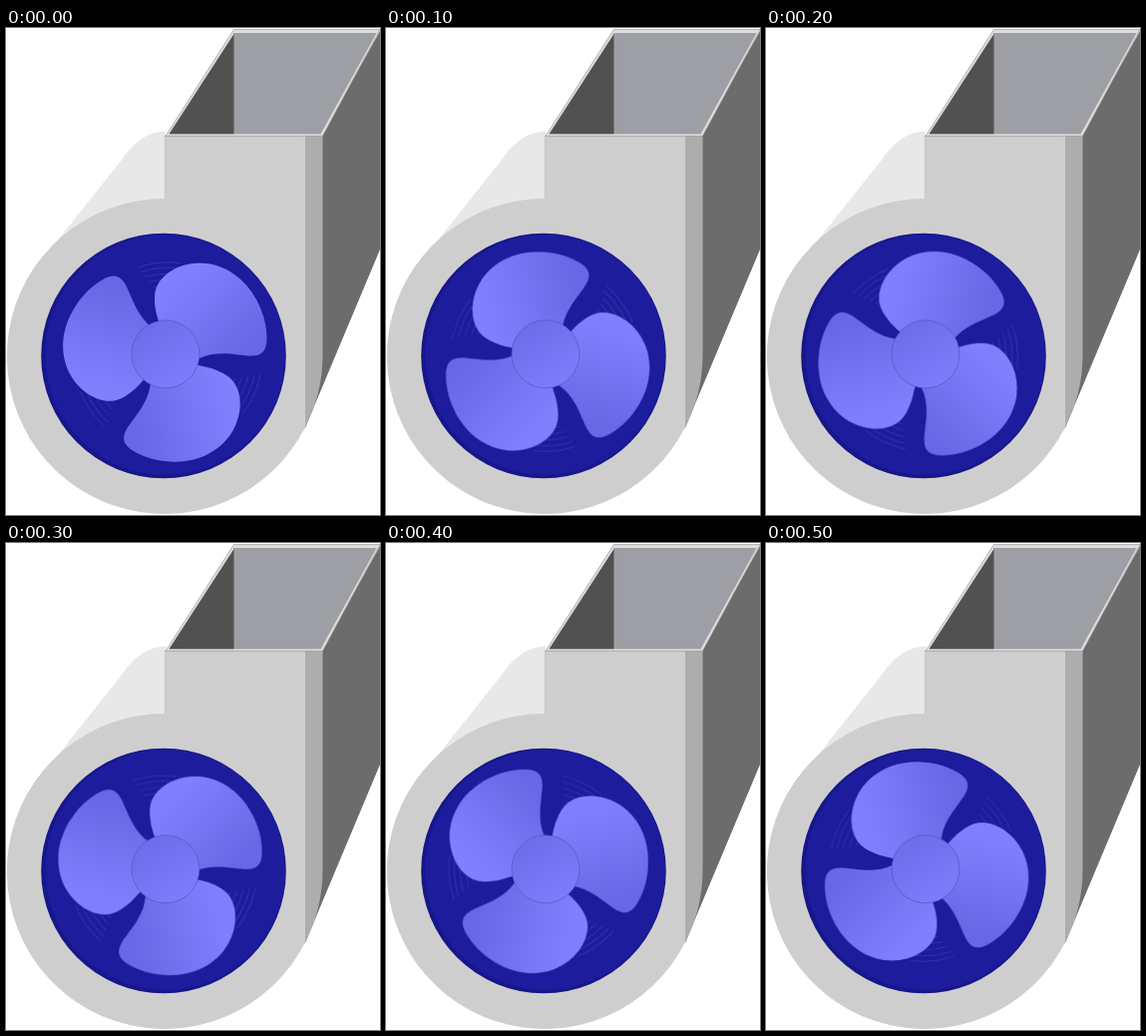
Recreate the animation shown at these times as an HTML page. Size 375 px wide and 488 px high, loop 600 ms.

```html
<!DOCTYPE html>
<html lang="en">
<head>
<meta charset="utf-8">
<title>Centrifugal blower</title>
<style>
  html, body { margin: 0; width: 100%; height: 100%; overflow: hidden; background: #fff; }
  svg { display: block; width: 375px; height: 488px; }
  #rotor {
    transform-origin: 160.2px 327px;
    animation: spin 600ms step-end infinite;
  }
  /* one double step, then 30 degrees per tick */
  @keyframes spin {
    0%      { transform: rotate(0deg); }
    16.667% { transform: rotate(60deg); }
    33.333% { transform: rotate(90deg); }
    50%     { transform: rotate(120deg); }
    66.667% { transform: rotate(150deg); }
    83.333% { transform: rotate(180deg); }
  }
  .streaks { fill: none; stroke: #4040b4; stroke-width: .7; stroke-dasharray: 27 93; }
</style>
</head>
<body>
<svg viewBox="0 0 375 488">
  <defs>
    <linearGradient id="bladeFill" gradientUnits="userSpaceOnUse" x1="178" y1="250" x2="246" y2="318">
      <stop offset="0" stop-color="#8080ff"/>
      <stop offset="1" stop-color="#6868e6"/>
    </linearGradient>
    <linearGradient id="hubFill" x1=".2" y1="0" x2=".8" y2="1">
      <stop offset="0" stop-color="#6c6cea"/>
      <stop offset="1" stop-color="#7e7efd"/>
    </linearGradient>
    <path id="blade" fill="url(#bladeFill)" d="M160 327 L153.500 295
      C150 285 148 275 149.500 265 C153 247 174 235.500 194 235.500
      C216 235.500 238 248 251 272 C258 285 261.500 298 261.500 311
      C261.500 323 257 328.500 246 328.500 C234 328.500 212 322 194 331 Z"/>
  </defs>

  <!-- housing -->
  <path fill="#e8e8e8" d="M47 219 L116 132 C128 115 141 104 160 103.500 V200 Z"/>
  <path fill="#6c6c6c" d="M316 108 L375 3 V222 L304.200 390.500 L300 401 Z"/>
  <path fill="#adadad" d="M299 107 H317.500 V329 A158 158 0 0 1 299 402 Z"/>
  <path fill="#cecece" d="M159.500 107 H300 V400 A158 158 0 1 1 159.500 171 Z"/>
  <path fill="none" stroke="#bcbcbc" stroke-width=".7" d="M159.300 108 V171"/>

  <!-- outlet -->
  <path fill="#dcdedc" stroke="#8c8c8c" stroke-width=".6" d="M160 108.300 L228.500 1.500 H375 L317.500 108.300 Z"/>
  <path fill="#9e9fa4" d="M228 5 H371.500 L315.500 106.300 H228 Z"/>
  <path fill="#515151" d="M163.500 106.300 L228.500 6 V106.300 Z"/>

  <!-- inlet -->
  <circle cx="158" cy="328.500" r="122.800" fill="#16168a"/>
  <circle cx="159.500" cy="327.500" r="120.500" fill="#1c1c9c"/>

  <g id="rotor">
    <g class="streaks">
      <circle cx="162.200" cy="329.200" r="71" pathLength="360" stroke-dashoffset="-18"/>
      <circle cx="162.200" cy="329.200" r="77" pathLength="360" stroke-dashoffset="-16"/>
      <circle cx="162.200" cy="329.200" r="83" pathLength="360" stroke-dashoffset="-14"/>
      <circle cx="162.200" cy="329.200" r="89" pathLength="360" stroke-dashoffset="-12"/>
      <circle cx="162.200" cy="329.200" r="94.500" pathLength="360" stroke-dashoffset="-11"/>
    </g>
    <use href="#blade"/>
    <use href="#blade" transform="rotate(120 162.200 329.200)"/>
    <use href="#blade" transform="rotate(240 162.200 329.200)"/>
  </g>

  <circle cx="160" cy="326.800" r="34" fill="url(#hubFill)" stroke="#5050c4" stroke-width=".6"/>
</svg>
</body>
</html>
```
